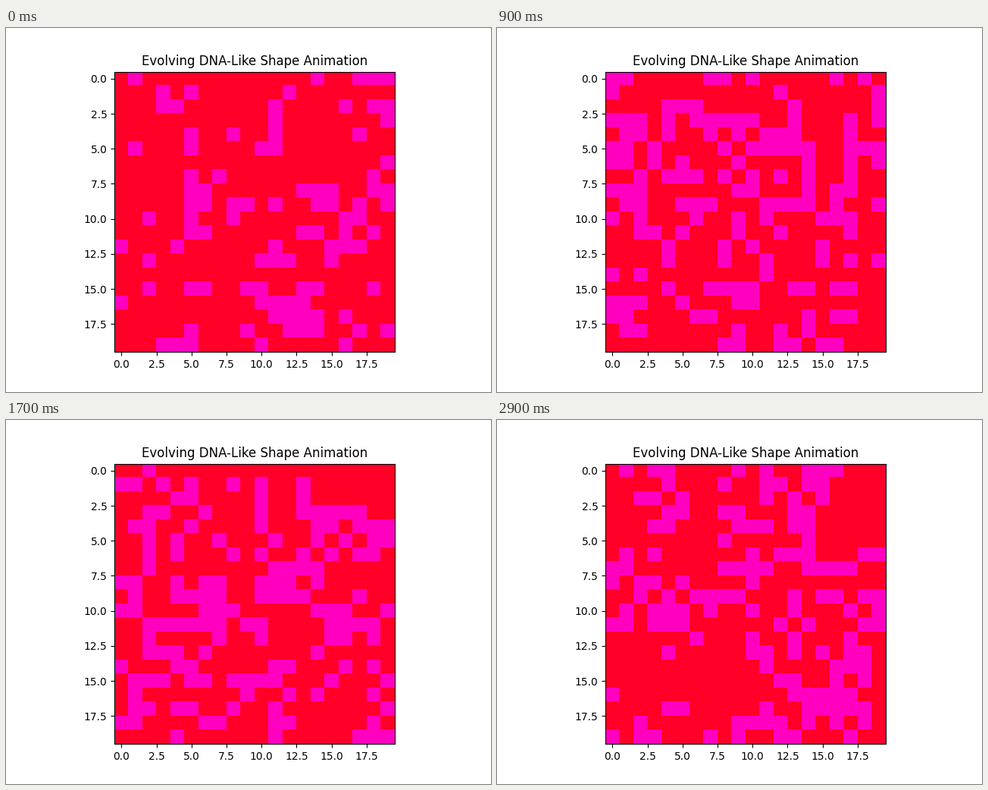
Animation, 640 px wide and 480 px high, one loop 3 s. Source, as a matplotlib script:

```python
import numpy as np
import matplotlib.pyplot as plt
from matplotlib.animation import FuncAnimation

SIZE = 20
FRAMES = 30
INTERVAL = 100


def live_share(step):
    """The colony grows, holds, thins out and recovers."""
    return np.interp(step, [0, 7, 17, 24, 29], [0.24, 0.36, 0.36, 0.25, 0.34])


def count_neighbours(grid):
    shifts = [(r, c) for r in (-1, 0, 1) for c in (-1, 0, 1) if (r, c) != (0, 0)]
    return sum(np.roll(grid, shift, axis=(0, 1)) for shift in shifts)


def evolve(grid, step, rng):
    """Favour cells with about three live neighbours, plus some mutation."""
    rows = np.arange(SIZE)[:, None]
    band = 0.7 * np.exp(-((rows - 8.5) / 1.8) ** 2)  # denser strand mid-height
    score = 0.5 * grid - np.abs(count_neighbours(grid) - 3) + band
    score = score + rng.normal(0, 1.2, grid.shape)
    return (score > np.quantile(score, 1 - live_share(step))).astype(int)


def build_grids():
    rng = np.random.default_rng(7)
    grid = (rng.random((SIZE, SIZE)) < live_share(0)).astype(int)
    grids = []
    for step in range(FRAMES):
        grid = evolve(grid, step, rng)
        grids.append(grid)
    return grids


grids = build_grids()

fig, ax = plt.subplots(figsize=(6.4, 4.8), dpi=100)
ax.set_title("Evolving DNA-Like Shape Animation")
image = ax.imshow(grids[0], cmap="gist_rainbow", vmin=0, vmax=1)


def update(frame):
    image.set_data(grids[frame])
    return [image]


anim = FuncAnimation(fig, update, frames=FRAMES, interval=INTERVAL,
                     repeat=True, repeat_delay=0)
plt.show()
```
